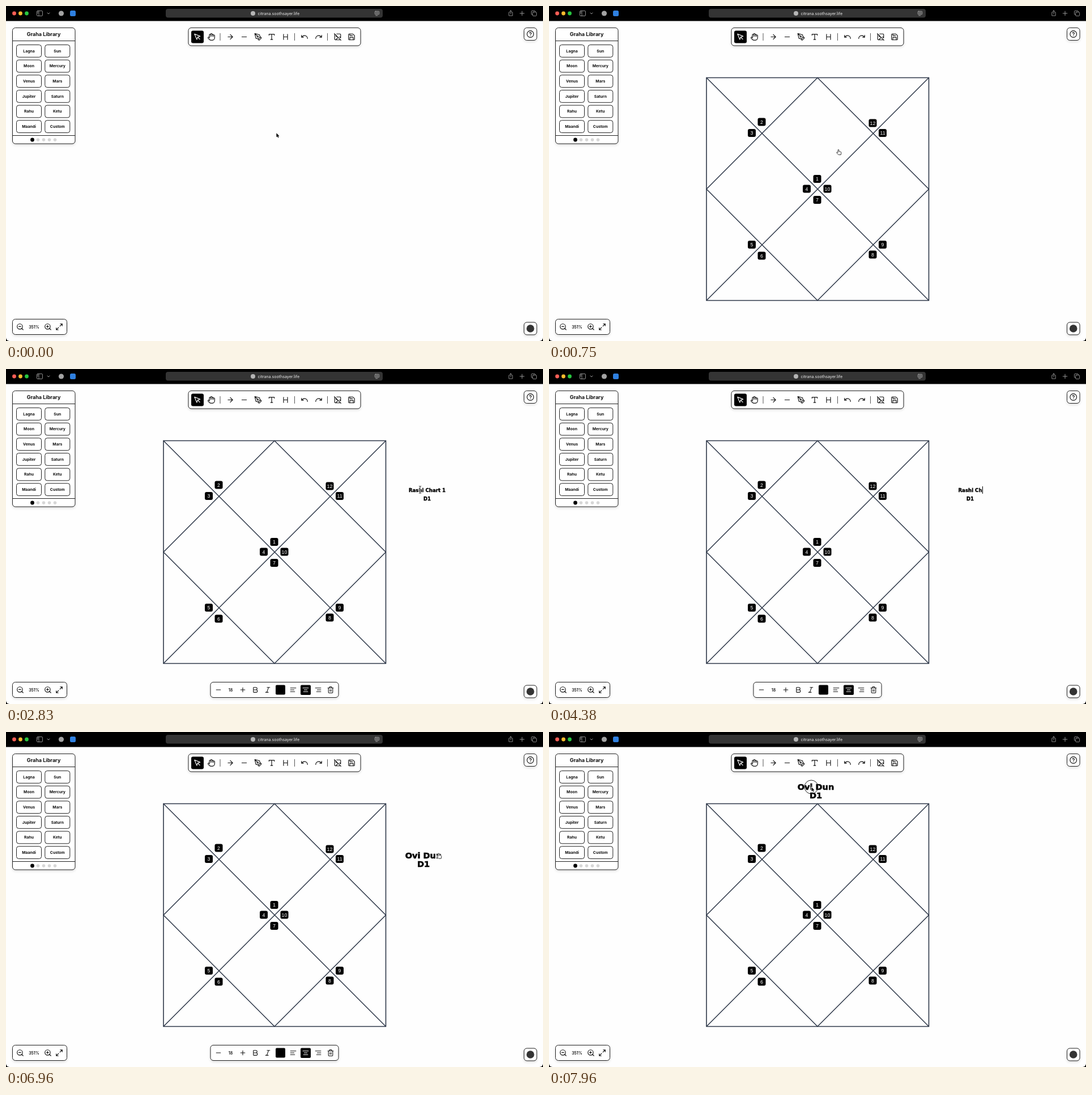
These frames come from a looping animation (948x591 px, 8000 ms). An HTML page with a canvas:

```html
<!DOCTYPE html>
<html lang="en">
<head>
<meta charset="utf-8">
<title>Chart editor</title>
<style>
html, body { margin: 0; width: 100%; height: 100%; overflow: hidden; background: #000; }
canvas { display: block; width: 948px; height: 591px; }
</style>
</head>
<body>
<canvas id="stage" width="948" height="591"></canvas>
<script>
const ctx = document.getElementById('stage').getContext('2d');
const LOOP = 8000;
const UI = 'Inter, "Liberation Sans", sans-serif';
const INK = '#111';

// Icons on a 24 unit grid
const circlePath = (x, y, r) => `M${x + r} ${y}a${r} ${r} 0 1 1-${2 * r} 0a${r} ${r} 0 1 1 ${2 * r} 0`;
const lens = circlePath(11, 11, 8) + 'M21 21l-4.35-4.35M8 11h6';
const icons = {
  select: 'M3 3l7.07 16.97 2.51-7.39 7.39-2.51zM13 13l6 6',
  hand: 'M18 11V6a2 2 0 0 0-4 0M14 10V4a2 2 0 0 0-4 0v2M10 10.5V6a2 2 0 0 0-4 0v8M18 8a2 2 0 1 1 4 0v6a8 8 0 0 1-8 8h-2c-2.8 0-4.5-.86-5.99-2.34l-3.6-3.6a2 2 0 0 1 2.83-2.82L7 15',
  arrow: 'M5 12h14M12 5l7 7-7 7',
  minus: 'M5 12h14',
  plus: 'M5 12h14M12 5v14',
  pen: 'M12 19l7-7 3 3-7 7zM18 13l-1.5-7.5L2 2l3.5 14.5L13 18zM2 2l7.6 7.6' + circlePath(11, 11, 2),
  type: 'M4 7V4h16v3M9 20h6M12 4v16',
  heading: 'M6 12h12M6 20V4M18 20V4',
  undo: 'M3 7v6h6M21 17a9 9 0 0 0-9-9 9 9 0 0 0-6 2.3L3 13',
  redo: 'M21 7v6h-6M3 17a9 9 0 0 1 9-9 9 9 0 0 1 6 2.3l3 2.7',
  imageOff: 'M2 2l20 20M10.41 10.41a2 2 0 1 1-2.83-2.83M13.5 13.5L6 21M18 12l3 3M3.59 3.59A2 2 0 0 0 3 5v14a2 2 0 0 0 2 2h14c.55 0 1.05-.22 1.41-.59M21 15V5a2 2 0 0 0-2-2H9',
  save: 'M15.2 3a2 2 0 0 1 1.4.6l3.8 3.8a2 2 0 0 1 .6 1.4V19a2 2 0 0 1-2 2H5a2 2 0 0 1-2-2V5a2 2 0 0 1 2-2zM17 21v-7a1 1 0 0 0-1-1H8a1 1 0 0 0-1 1v7M7 3v4a1 1 0 0 0 1 1h7',
  help: circlePath(12, 12, 10) + 'M9.09 9a3 3 0 0 1 5.83 1c0 2-3 3-3 3M12 17h.01',
  zoomOut: lens,
  zoomIn: lens + 'M11 8v6',
  expand: 'M15 3h6v6M9 21H3v-6M21 3l-7 7M3 21l7-7',
  bold: 'M6 12h9a4 4 0 0 1 0 8H7a1 1 0 0 1-1-1V5a1 1 0 0 1 1-1h7a4 4 0 0 1 0 8',
  italic: 'M19 4h-9M14 20H5M15 4L9 20',
  left: 'M15 12H3M17 18H3M21 6H3',
  center: 'M17 12H7M19 18H5M21 6H3',
  right: 'M21 12H9M21 18H7M21 6H3',
  trash: 'M3 6h18M19 6v14a2 2 0 0 1-2 2H7a2 2 0 0 1-2-2V6M8 6V4a2 2 0 0 1 2-2h4a2 2 0 0 1 2 2v2M10 11v6M14 11v6',
  sidebar: 'M5 3h14a3 3 0 0 1 3 3v12a3 3 0 0 1-3 3H5a3 3 0 0 1-3-3V6a3 3 0 0 1 3-3zM9 3v18M4.5 7h2M4.5 11h2',
  chevron: 'M6 9l6 6 6-6',
  reader: 'M5 2h14a3 3 0 0 1 3 3v9a3 3 0 0 1-3 3H5a3 3 0 0 1-3-3V5a3 3 0 0 1 3-3zM6 7h12M6 12h12M6 22h8',
  share: 'M8 9H5v13h14V9h-3M12 15V2M8 6l4-4 4 4',
  tabs: 'M10 7h9a3 3 0 0 1 3 3v9a3 3 0 0 1-3 3h-9a3 3 0 0 1-3-3v-9a3 3 0 0 1 3-3zM7 17H5a3 3 0 0 1-3-3V5a3 3 0 0 1 3-3h9a3 3 0 0 1 3 3v2'
};
for (const k in icons) icons[k] = new Path2D(icons[k]);

const pointers = {
  arrow: new Path2D('M.4.3v7.3l1.7-1.500 1.200 2.400 1.200-.5-1.100-2.400h2.200z'),
  hand: new Path2D('M-.9 5.3V.9a.9.9 0 0 1 1.8 0v2.4l3 .7c.9.2 1.2.8 1 1.6l-.6 3.6H.1L-3.2 5.7c-.5-.8.4-1.5 1.1-1z'),
  beam: new Path2D('M-2-6.5q2 0 2 1.5v10q0 1.5-2 1.5M2-6.5q-2 0-2 1.5M2 6.5q-2 0-2-1.5')
};

function icon(name, x, y, size = 14, color = INK, weight = 2) {
  const s = size / 24;
  ctx.save();
  ctx.translate(x - size / 2, y - size / 2);
  ctx.scale(s, s);
  ctx.lineWidth = weight;
  ctx.lineCap = ctx.lineJoin = 'round';
  ctx.strokeStyle = color;
  ctx.stroke(icons[name]);
  ctx.restore();
}

function box(x, y, w, h, r, fill, stroke, shadow) {
  ctx.save();
  ctx.beginPath();
  ctx.roundRect(x, y, w, h, r);
  if (shadow) {
    ctx.shadowColor = 'rgba(0,0,0,.16)';
    ctx.shadowBlur = 5;
    ctx.shadowOffsetY = 2;
  }
  ctx.fillStyle = fill;
  ctx.fill();
  ctx.shadowColor = 'transparent';
  if (stroke) {
    ctx.strokeStyle = stroke;
    ctx.lineWidth = 1;
    ctx.stroke();
  }
  ctx.restore();
}
const panel = (x, y, w, h) => box(x, y, w, h, 5, '#fff', '#222', true);

function dot(x, y, r, fill) {
  ctx.beginPath();
  ctx.arc(x, y, r, 0, 7);
  ctx.fillStyle = fill;
  ctx.fill();
}

function line(color, width, ...pts) {
  ctx.beginPath();
  for (let i = 0; i < pts.length; i += 2) ctx.lineTo(pts[i], pts[i + 1]);
  ctx.strokeStyle = color;
  ctx.lineWidth = width;
  ctx.stroke();
}

function label(str, x, y, font, color = INK, align = 'center') {
  ctx.font = font;
  ctx.fillStyle = color;
  ctx.textAlign = align;
  ctx.fillText(str, x, y);
}

// Interpolates rows of [time, x, y]
function along(keys, t) {
  let i = 0;
  while (i < keys.length - 1 && keys[i + 1][0] <= t) i++;
  const a = keys[i], b = keys[i + 1] || a;
  const k = b === a ? 0 : Math.max(0, (t - a[0]) / (b[0] - a[0]));
  const e = k * k * (3 - 2 * k) * .5 + k * .5;
  return [a[1] + (b[1] - a[1]) * e, a[2] + (b[2] - a[2]) * e];
}

function browser() {
  ctx.fillStyle = '#000';
  ctx.fillRect(0, 0, 948, 591);
  box(0, 26.6, 948, 564.4, [0, 0, 6, 6], '#fefefe');
  ['#ff5f57', '#febc2e', '#28c840'].forEach((c, i) => dot(14.5 + i * 11, 13, 3.4, c));
  const gray = '#a3a3a3';
  icon('sidebar', 59.5, 13, 12, gray, 1.7);
  icon('chevron', 75, 13, 8, gray, 3);
  dot(97.5, 13, 4.6, gray);
  box(113, 8, 10, 10, 2.5, '#2f80e0');
  box(282, 5, 383, 15.5, 4, '#343434');
  dot(436, 13, 4, '#b5b5b5');
  label('citrana.soothsayer.life', 444.5, 15.6, '7.1px ' + UI, '#eee', 'left');
  icon('reader', 655, 13, 9, '#bbb');
  icon('share', 891, 12.5, 11, gray, 1.8);
  icon('plus', 911, 13, 13, gray, 1.7);
  icon('tabs', 932, 13, 11, gray, 1.8);
}

const grahas = ['Lagna', 'Sun', 'Moon', 'Mercury', 'Venus', 'Mars', 'Jupiter', 'Saturn', 'Rahu', 'Ketu', 'Maandi', 'Custom'];

function library() {
  panel(11.5, 38.5, 110.5, 204.5);
  label('Graha Library', 66.5, 53.3, '700 9px ' + UI);
  line('#222', 1, 11.5, 61.5, 122, 61.5);
  line('#222', 1, 11.5, 228.5, 122, 228.5);
  grahas.forEach((name, i) => {
    const x = 18.5 + (i % 2) * 50.3, y = 68.5 + (i >> 1) * 26.65;
    box(x, y, 44, 21.8, 4, '#fff', '#222');
    label(name, x + 22, y + 13.2, '700 6.8px ' + UI);
  });
  for (let i = 0; i < 5; i++) dot(46.5 + i * 10, 236, i ? 2.8 : 3.4, i ? '#d6d6d6' : '#000');
}

const tools = [['select', 338], ['hand', 362.5], ['arrow', 396], ['minus', 420.5], ['pen', 445], ['type', 469],
  ['heading', 493.5], ['undo', 527], ['redo', 552], ['imageOff', 585.5], ['save', 610]];

function toolbar(active) {
  panel(322, 38.5, 304, 31.5);
  for (const x of [378, 509.5, 567.5]) line('#555', 1, x, 48, x, 61);
  for (const [name, x] of tools) {
    const on = name === active;
    if (on) box(x - 11, 43.5, 22, 22, 3, '#000');
    icon(name, x, 54.5, 14, on ? '#fff' : INK);
  }
}

function corners() {
  panel(914.5, 38.5, 22.5, 22);
  icon('help', 925.7, 49.5, 14);
  panel(914.5, 558, 22.5, 22);
  dot(925.7, 569, 6.8, '#333');
  panel(11.5, 552.5, 96, 27);
  icon('zoomOut', 25, 566, 14);
  label('351%', 49.5, 568.5, '600 7px ' + UI);
  icon('zoomIn', 74, 566, 14);
  icon('expand', 94, 566, 14);
}

function formatBar() {
  panel(361, 552.5, 226, 27);
  label('18', 396.5, 568.5, '600 7px ' + UI);
  box(476, 557.5, 17, 17, 2, '#000');
  box(520, 557.5, 18, 17.5, 2, '#000');
  [['minus', 375], ['plus', 418], ['bold', 440], ['italic', 462], ['left', 507], ['center', 529], ['right', 551], ['trash', 573]]
    .forEach(([name, x]) => icon(name, x, 566, 13, name === 'center' ? '#fff' : INK));
}

const houses = [[473.5, 305], [375.5, 204.5], [358, 224], [455, 322.5], [358, 421], [375.5, 440.5],
  [473.5, 342], [571.5, 438.5], [589, 421], [491.5, 322.5], [589, 224], [571.5, 206.5]];

function chart() {
  const l = 278, r = 670.5, t = 126.5, b = 519.5, cx = 474, cy = 323, c = '#2d3748';
  line(c, 1.6, l, t, r, t, r, b, l, b, l, t - .8);
  line(c, 1.5, l, t, r, b);
  line(c, 1.5, r, t, l, b);
  line(c, 1.5, cx, t, r, cy, cx, b, l, cy, cx, t);
  houses.forEach(([x, y], i) => {
    box(x - 7, y - 7, 14, 14, 3, '#000');
    label(i + 1, x, y + 3.1, '8.8px "Liberation Sans", Arial, sans-serif', '#fff');
  });
}

// Heading: placed, edited, then dragged
const TITLE = 'Rashi Chart 1', NAME = 'Ovi Dun';
const PLACE = 1790, EDIT = 2500, ERASE = 3920, COMMIT = 6580, GRAB = 7170;
const typedAt = [5460, 5630, 5730, 5830, 6130, 6230, 6330];
const headingPath = [[GRAB + 30, 737, 217.5], [7420, 515, 110.5], [7620, 474, 98], [7750, 469.5, 96.5], [7960, 471, 97]];

function heading(str, x, y, size, lead) {
  const font = `bold ${size}px "DejaVu Sans", sans-serif`;
  ctx.strokeStyle = '#000';
  ctx.lineWidth = size * .04;
  [str, 'D1'].forEach((s, i) => {
    const base = y + i * lead + size * .365;
    label(s, x, base, font, '#000');
    ctx.strokeText(s, x, base);
  });
  return ctx.measureText(str).width;
}

function title(t) {
  if (t < PLACE) return;
  if (t < EDIT) return heading(TITLE, 760.5, 218, 14.5, 15);
  if (t >= COMMIT) return heading(NAME, ...along(headingPath, t), 14.5, 15);
  const cut = t < ERASE ? 0 : 1 + Math.floor((t - ERASE) / 104);
  const str = t < typedAt[0]
    ? TITLE.slice(0, Math.max(0, TITLE.length - cut))
    : NAME.slice(0, typedAt.filter(k => k <= t).length);
  const w = heading(str, 743.5, 214, 8.6, 14.5);
  // The caret blinks before the first letter until erasing starts
  const x = 743.5 + (cut ? w / 2 + 1 : -w / 2 - .5);
  if (cut || Math.floor((t - 2830) / 545) % 2) line('#000', 1, x, 207, x, 220);
}

const pointerPath = [[210, 477, 224], [750, 511, 253.5], [1000, 499, 130], [1150, 493, 50], [1300, 493, 50],
  [1740, 714, 212], [1830, 715, 212], [1920, 720.5, 213.5], [2080, 720.5, 213.5], [2280, 731, 213],
  [2830, 731, 213], [3580, 764, 213], [3710, 768, 213], [6960, 764, 214], [7130, 729, 217], [GRAB, 729, 217],
  [7420, 493, 108], [7620, 463, 97], [7750, 461, 96], [7960, 463, 97]];
const presses = [[1180, 1280], [1760, 1850], [2280, 2360], [2420, 2500], [GRAB, LOOP]];

function pointer(t) {
  if (t >= ERASE && t < 6960) return;
  const [x, y] = along(pointerPath, t);
  let kind = 'arrow';
  if (t >= EDIT && t < ERASE) kind = 'beam';
  else if (t >= PLACE && t < GRAB || t >= 210 && t < 1180 && y > 126) kind = 'hand';
  const shape = pointers[kind];
  ctx.save();
  ctx.translate(x, y);
  ctx.lineJoin = 'round';
  ctx.strokeStyle = '#fff';
  ctx.lineWidth = 2;
  ctx.stroke(shape);
  if (kind === 'arrow') {
    ctx.fillStyle = '#000';
    ctx.fill(shape);
  } else {
    ctx.fillStyle = '#fff';
    if (kind === 'hand') ctx.fill(shape);
    ctx.strokeStyle = '#222';
    ctx.lineWidth = .9;
    ctx.stroke(shape);
  }
  ctx.restore();
  if (presses.some(([a, b]) => t >= a && t < b)) {
    ctx.beginPath();
    ctx.arc(x, y, 12, 0, 7);
    ctx.strokeStyle = '#222';
    ctx.lineWidth = 1;
    ctx.stroke();
  }
}

function frame() {
  const t = performance.now() % LOOP;
  browser();
  if (t >= 210) chart();
  title(t);
  library();
  toolbar(t >= 1260 && t < 1880 ? 'heading' : 'select');
  corners();
  if (t >= 2340 && t < GRAB) formatBar();
  pointer(t);
  requestAnimationFrame(frame);
}
requestAnimationFrame(frame);
</script>
</body>
</html>
```
